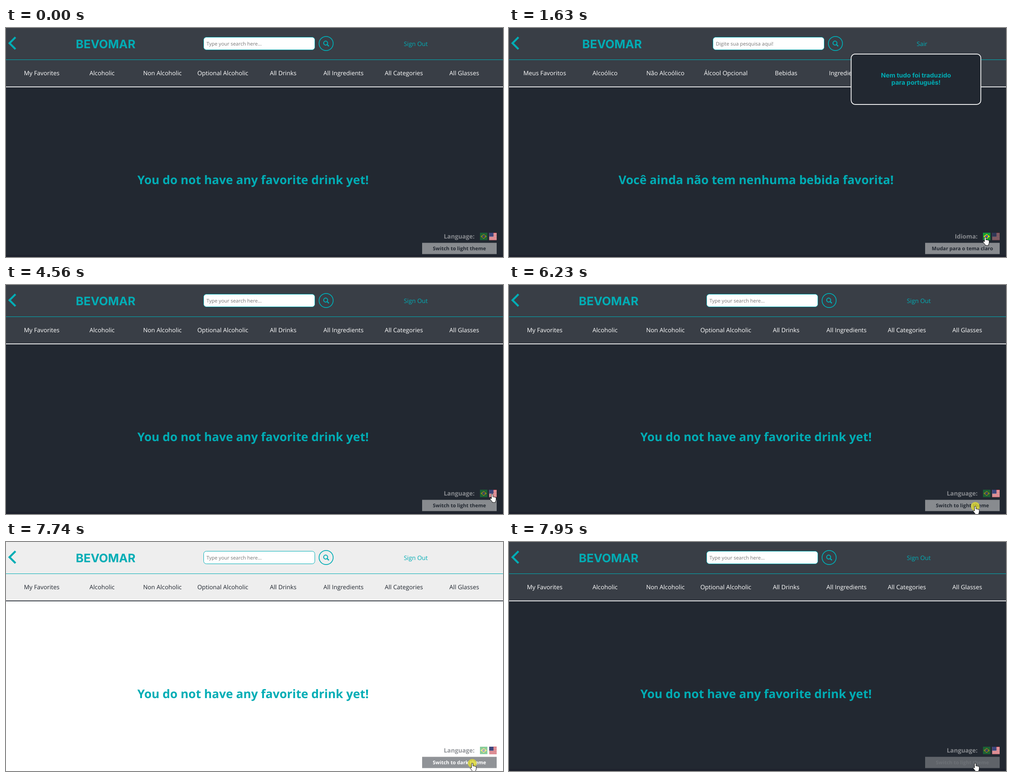
These frames come from a looping animation (1100 by 509 pixels, 8000 ms). An HTML page:

```html
<!DOCTYPE html>
<html lang="en">
<head>
<meta charset="utf-8">
<title>Drinks</title>
<style>
  html, body { margin: 0; height: 100%; overflow: hidden; background: #222831; }
  svg { display: block; width: 100vw; height: 100vh; font: 13.35px "Open Sans", sans-serif; }
  text { text-rendering: geometricPrecision; }
  .mid { text-anchor: middle; }
  .brand { font-family: Inter, sans-serif; font-weight: 700; }
  .bold { font-weight: 700; }
</style>
</head>
<body>
<svg id="stage" viewBox="0 0 1100 509"></svg>
<script>
const LOOP = 8000, TEAL = '#00adb5', INK = '#222831', PALE = '#eeeeee';

const WORDS = {
  en: {
    nav: ['My Favorites', 'Alcoholic', 'Non Alcoholic', 'Optional Alcoholic',
          'All Drinks', 'All Ingredients', 'All Categories', 'All Glasses'],
    hint: 'Type your search here...', out: 'Sign Out', lang: 'Language:',
    title: 'You do not have any favorite drink yet!',
    toLight: 'Switch to light theme', toDark: 'Switch to dark theme',
    logoX: 220.5, searchX: 437, outX: 907
  },
  pt: {
    nav: ['Meus Favoritos', 'Alcoólico', 'Não Alcoólico', 'Álcool Opcional',
          'Bebidas', 'Ingredientes', 'Categorias', 'Copos'],
    hint: 'Digite sua pesquisa aqui!', out: 'Sair', lang: 'Idioma:',
    title: 'Você ainda não tem nenhuma bebida favorita!',
    toLight: 'Mudar para o tema claro', toDark: 'Mudar para o tema escuro',
    logoX: 228, searchX: 451, outX: 914
  }
};

// Pointer keyframes: time, x, y
const PATH = [
  [530, 1097, 504], [960, 1045, 474], [1090, 1054, 465],
  [3090, 1054, 465], [3420, 1076, 465],
  [5280, 1076, 465], [6100, 1032, 492]
];
// Click flashes: start, end
const CLICKS = [[1490, 1630], [3960, 4060], [6230, 6300], [7740, 7810]];

const within = (t, a, b) => t >= a && t < b;
const clamp = v => Math.max(0, Math.min(1, v));
const rect = (x, y, w, h, fill, more = '') =>
  `<rect x="${x}" y="${y}" width="${w}" height="${h}" fill="${fill}" ${more}/>`;
const text = (x, y, str, fill, more = '') =>
  `<text x="${x}" y="${y}" fill="${fill}" ${more}>${str}</text>`;

function mix(a, b, p) {
  const part = (hex, i) => parseInt(hex.slice(i, i + 2), 16);
  return `rgb(${[1, 3, 5].map(i => Math.round(part(a, i) + (part(b, i) - part(a, i)) * p))})`;
}

function pointer(t) {
  const n = PATH.findIndex(k => k[0] > t);
  if (n < 0) return PATH[PATH.length - 1].slice(1);
  const [t0, x0, y0] = PATH[n - 1], [t1, x1, y1] = PATH[n];
  const u = (t - t0) / (t1 - t0), e = u * u * (3 - 2 * u);
  return [x0 + (x1 - x0) * e, y0 + (y1 - y0) * e];
}

function header(w, light) {
  const x = w.searchX, fore = light ? INK : '#ffffff';
  return rect(0, 0, 1100, 131, light ? '#eeeeee' : '#393e46') +
    rect(0, 70, 1100, 1, TEAL) +
    rect(0, 130, 1100, 1.7, light ? INK : '#ffffff') +
    `<g fill="none" stroke="${TEAL}">
      <path d="M21 20.5L7.8 33.8 21 47" stroke-width="4.4"/>
      <circle cx="${x + 271.5}" cy="34.5" r="15.6" stroke-width="1.7"/>
      <circle cx="${x + 270.5}" cy="33.5" r="4.4" stroke-width="2"/>
      <path d="M${x + 273.8} 36.8l3.8 3.8" stroke-width="2.5"/>
    </g>` +
    text(w.logoX, 45, 'BEVOMAR', TEAL, 'class="mid brand" font-size="26"') +
    rect(x + .5, 20.5, 246, 28, '#ffffff', `rx="6" stroke="${TEAL}"`) +
    text(x + 6.7, 39, w.hint, '#757575', 'font-size="11"') +
    text(w.outX, 39.5, w.out, TEAL, 'class="mid"') +
    w.nav.map((s, i) => text(79 + 133.6 * i, 105, s, fore, 'class="mid"')).join('');
}

const toast = () =>
  rect(757.3, 57.8, 287, 112, INK, 'rx="9" stroke="#ffffff" stroke-width="1.7"') +
  ['Nem tudo foi traduzido', 'para português!'].map((s, i) =>
    text(900.8, 110 + 16 * i, s, TEAL, 'class="mid brand" font-size="13.9"')).join('');

function flags(pt) {
  let stripes = '';
  for (let i = 0; i < 7; i++) stripes += rect(0, i * 2.5, 16.5, 1.3, '#c8313e');
  let stars = '';
  for (let i = 0; i < 9; i++)
    stars += rect(1.3 + i % 3 * 2.8, 1.3 + (i / 3 | 0) * 2.6, .9, .9, '#c5cbe0');
  return `<g transform="translate(1049 455)" opacity="${pt ? 1 : .5}">
      ${rect(0, 0, 16.5, 16.5, '#159b3a')}
      <path d="M1.3 8.2L8.2 3l7 5.2-7 5.3z" fill="#fedf00"/>
      <circle cx="8.2" cy="8.2" r="3" fill="#1b3a86"/>
      <path d="M5.4 7.5q3-.5 5.4 1.8" stroke="#fff" stroke-width=".7" fill="none"/>
    </g>
    <g transform="translate(1069.5 455)" opacity="${pt ? .5 : 1}">
      ${rect(0, 0, 16.5, 16.5, '#f4f4f4')}${stripes}
      ${rect(0, 0, 9.3, 8.8, '#2c3570')}${stars}
    </g>`;
}

function controls(w, pt, light, t) {
  const since = t - (light ? 6300 : 7810);
  const p = since < 0 ? 1 : 1 - Math.pow(1 - clamp(since / 280), 1.3);
  const back = light ? mix(PALE, INK, p) : mix(INK, PALE, p);
  const fore = light ? mix(INK, '#ffffff', p) : mix('#ffffff', INK, p);
  // White label stays solid once the light theme has settled
  const labelAlpha = light ? .5 + .5 * p : p < 1 ? .5 : 1;
  return text(1037, 468, w.lang, light ? INK : PALE,
      'class="bold" text-anchor="end" opacity=".5"') +
    flags(pt) +
    rect(921, 477.5, 165, 25, back, 'opacity=".5"') +
    text(1003.5, 494, light ? w.toDark : w.toLight, fore,
      `class="mid bold" font-size="11" opacity="${labelAlpha}"`);
}

function hand(t) {
  if (t < PATH[0][0]) return '';
  const [x, y] = pointer(t);
  const flash = CLICKS.some(([a, b]) => within(t, a, b));
  return `<g transform="translate(${x} ${y})">
    ${flash ? '<circle r="9.8" fill="#e6e02c" opacity=".75"/>' : ''}
    <path d="M-1.7 10.3V1.2a1.6 1.6 0 0 1 3.2 0V6q1.4-1 2.5.3 1.4-.8 2.4.5 2.4-.4 2.4 1.6V12q0 2-1.4 4v2.3H.2V17l-4.6-5.8q-.8-1.6.6-2.1 1.2-.2 2.1 1.2z"
      fill="#fff" stroke="#111" stroke-width="1"/>
  </g>`;
}

const stage = document.getElementById('stage');

function draw(t) {
  const pt = within(t, 1630, 4060), light = within(t, 6300, 7810);
  const w = WORDS[pt ? 'pt' : 'en'];
  stage.innerHTML =
    rect(0, 0, 1100, 509, light ? '#ffffff' : INK) +
    (light ? '' : rect(0, 504.5, 1100, 4.5, '#1e222d')) +
    header(w, light) +
    text(546.8, 347, w.title, TEAL, 'class="mid bold" font-size="26.4"') +
    (within(t, 1630, 4560) ? toast() : '') +
    controls(w, pt, light, t) +
    hand(t);
}

const start = performance.now();
function tick() {
  draw((performance.now() - start) % LOOP);
  requestAnimationFrame(tick);
}
tick();
</script>
</body>
</html>
```
